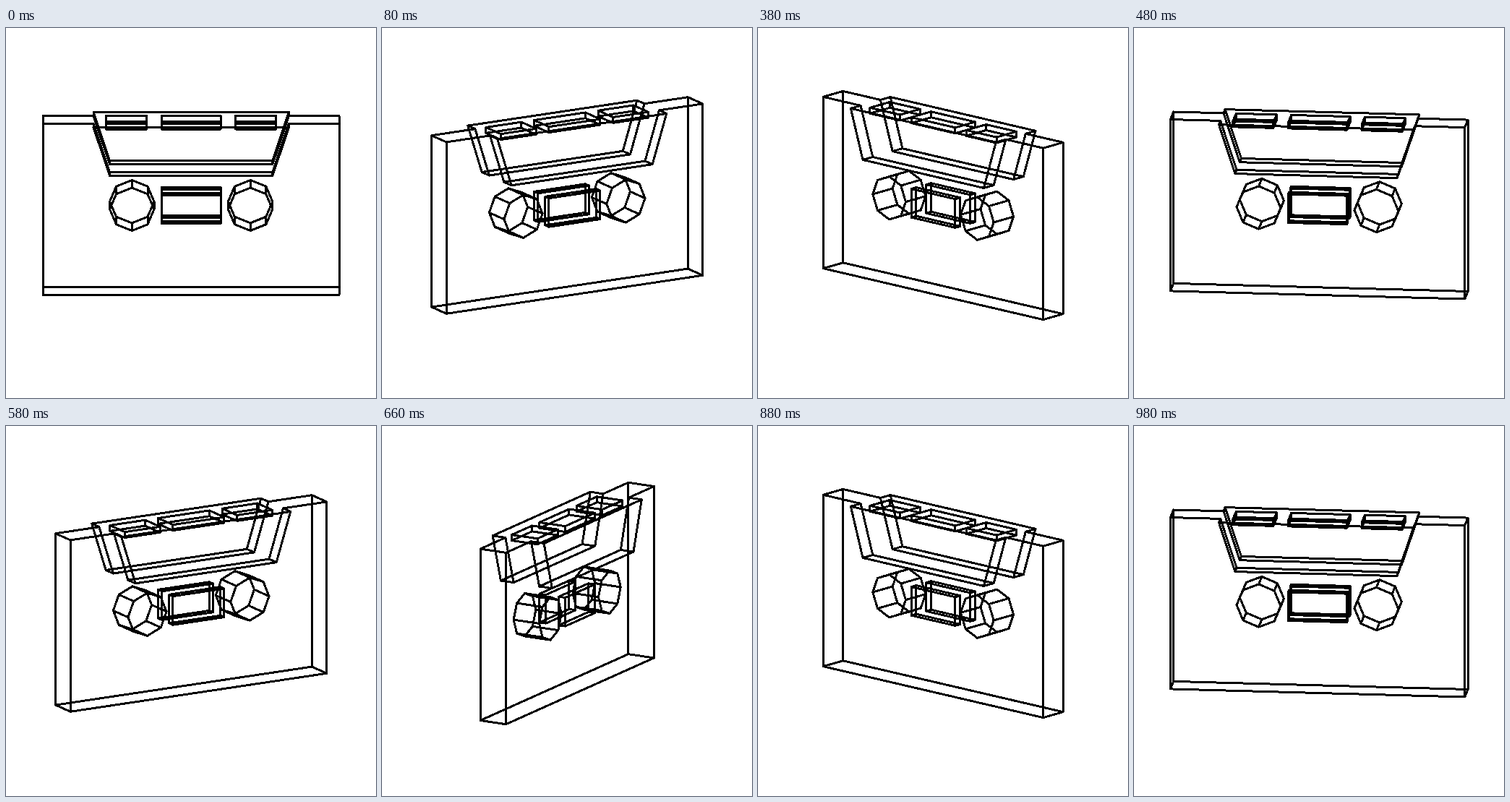
Recreate the animation shown at these times as an HTML page. Size 512 by 512 pixels, loop 1000 ms.

```html
<!DOCTYPE html>
<html lang="en">
<head>
<meta charset="utf-8">
<title>Wireframe cassette</title>
<style>
html, body { margin: 0; width: 100%; height: 100%; overflow: hidden; background: #fff; }
svg { display: block; }
</style>
</head>
<body>
<svg width="512" height="512" viewBox="0 0 512 512">
  <path id="wire" fill="none" stroke="#000" stroke-width="3" stroke-linecap="round" shape-rendering="crispEdges"/>
</svg>
<script>
const wire = document.getElementById('wire');
const UNIT = 20.48, CX = 256.2, CY = 245.5;
const TILT = Math.PI / 12, COS_T = Math.cos(TILT), SIN_T = Math.sin(TILT);
const LOOP = 1000, TICK = 20, STEPS = 60;

const edges = [];
const edge = (a, b) => edges.push([a, b]);
const ring = pts => pts.forEach((p, i) => edge(p, pts[(i + 1) % pts.length]));
const atDepth = (pts, z) => pts.map(([x, y]) => [x, y, z]);

// Two matching outlines joined corner to corner
function join(a, b) {
  ring(a);
  ring(b);
  a.forEach((p, i) => edge(p, b[i]));
}
const prism = (pts, z0, z1) => join(atDepth(pts, z0), atDepth(pts, z1));

// Body with a notch on top where the thick part joins
const corners = [[-10, 6], [-10, -6], [10, -6], [10, 6]];
const notch = [[6.6, 6], [5.5, 2.6], [-5.5, 2.6], [-6.6, 6]];
corners.forEach(([x, y]) => edge([x, y, -1], [x, y, 1]));

for (const side of [-1, 1]) {
  ring(atDepth([...corners, ...notch], side));
  ring(atDepth(notch, 2 * side));
  notch.forEach(([x, y]) => edge([x, y, side], [x, y, 2 * side]));
  prism([[-2, 1], [2, 1], [2, -1], [-2, -1]], side, side / 2);

  const wheel = Array.from({ length: 8 }, (_, i) => {
    const a = i * Math.PI / 4;
    return [4 * side + 1.5 * Math.sin(a), 1.5 * Math.cos(a)];
  });
  prism(wheel, -1, 1);
}

// Slots in the top face
for (const [l, r] of [[-5.75, -3], [-2, 2], [3, 5.75]]) {
  const rim = y => [[l, y, -1], [l, y, 1], [r, y, 1], [r, y, -1]];
  join(rim(6), rim(5.6));
}

function draw(time) {
  const tick = Math.floor(time % LOOP / TICK);
  const step = Math.ceil(tick * 6 / 5);
  const turn = step * 2 * Math.PI / STEPS;
  const c = Math.cos(turn), s = Math.sin(turn);
  const project = ([x, y, z]) => [
    CX + UNIT * (x * c + z * s),
    CY + UNIT * ((z * c - x * s) * SIN_T - y * COS_T)
  ].map(v => v.toFixed(2));

  wire.setAttribute('d', edges.map(([a, b]) => `M${project(a)}L${project(b)}`).join(''));
}

function loop() {
  draw(performance.now());
  requestAnimationFrame(loop);
}
loop();
</script>
</body>
</html>
```
